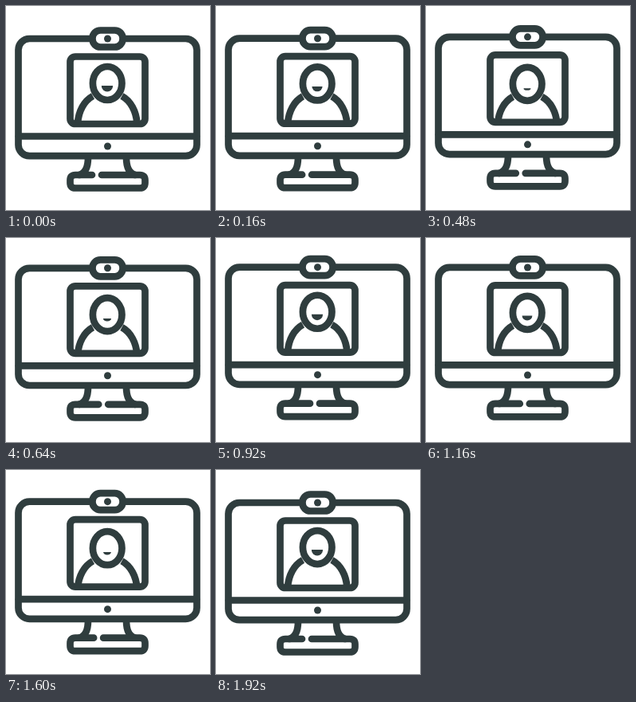
Animation, 256 px wide and 256 px high, one loop 1.96 s. Source, as an HTML page:

```html
<!DOCTYPE html>
<html lang="en">
<head>
<meta charset="utf-8">
<title>Video call</title>
<style>
  html, body { margin: 0; width: 100%; height: 100%; overflow: hidden; background: #fff; }
  svg { display: block; width: 100vw; height: 100vh; }
  #screen { fill: #fff; stroke: #2f3d3e; stroke-width: 8.7; stroke-linecap: round; stroke-linejoin: round; }
  .line { fill: none; }
  .solid { fill: #2f3d3e; stroke: none; }
</style>
</head>
<body>
<svg viewBox="0 0 256 256">
  <g id="screen">
    <path class="line" d="M103 190C103 203 99 210 92 212M151 190C151 203 155 210 162 212"/>
    <path class="line" id="base"/>
    <rect x="15.5" y="41" width="224" height="147.2" rx="14"/>
    <path d="M16 163.5H239"/>
    <rect x="108.5" y="30.5" width="38" height="21" rx="10"/>
    <circle class="solid" cx="127.5" cy="41" r="4.5"/>
    <circle class="solid" cx="127.5" cy="176" r="4.5"/>
    <rect x="80.5" y="63.5" width="94" height="84.5" rx="6.5"/>
    <g id="person">
      <path class="line" stroke-linecap="butt" style="stroke-linecap: butt"
        d="M90 147C91 132 98 119 109 113M164.4 147C163.4 132 156.4 119 145.4 113"/>
      <ellipse cx="127.2" cy="97" rx="18.3" ry="21"/>
      <path class="solid" id="mouth"/>
    </g>
  </g>
</svg>
<script>
  const LOOP = 1960, STEP = 40;
  const [screen, base, person, mouth] =
    ["screen", "base", "person", "mouth"].map(id => document.getElementById(id));
  const mix = (a, b, k) => a + (b - a) * k;
  const smooth = k => k * k * (3 - 2 * k);
  const drop = (el, y) => el.setAttribute("transform", `translate(0 ${y})`);

  function draw(now) {
    const t = Math.floor(now % LOOP / STEP) * STEP;
    const angle = 2 * Math.PI * t / LOOP;
    const rise = (1 - Math.cos(angle)) / 2;
    const open = (1 + Math.cos(2 * angle)) / 2;

    drop(screen, -4.4 * rise);
    // The person nods down as the mouth closes
    drop(person, 3 * (1 - open));

    // The gap in the foot slides sideways as the screen rises
    const gap = mix(108, 118, smooth(rise));
    base.setAttribute("d", `M${gap} 212H87Q80.5 212 80.5 218.5V222Q80.5 228.5 87 228.5` +
      `H168Q174.5 228.5 174.5 222V218.5Q174.5 212 168 212H${gap + 12}`);

    const w = mix(4.5, 7.2, open), h = mix(2.6, 7.5, open), y = mix(102.3, 100, open);
    mouth.setAttribute("d", `M${127 - w} ${y}H${127 + w}A${w} ${h} 0 0 1 ${127 - w} ${y}Z`);
    requestAnimationFrame(() => draw(performance.now()));
  }
  draw(0);
</script>
</body>
</html>
```
